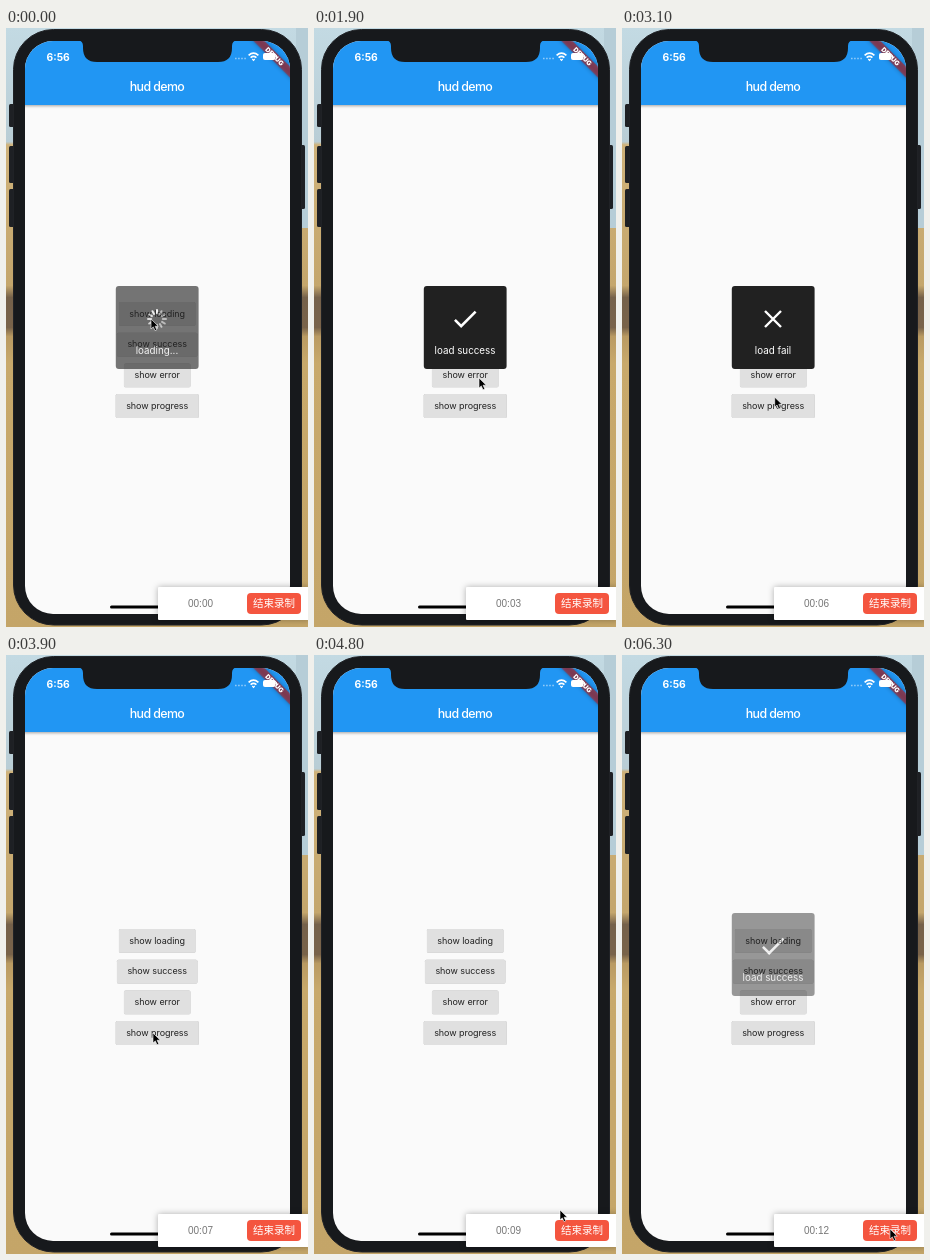
An HTML page for the animation above (6400 ms loop, 302x599 px).

```html
<!DOCTYPE html>
<html lang="en">
<head>
<meta charset="utf-8">
<title>HUD demo</title>
<style>
  html, body { margin: 0; width: 100%; height: 100%; overflow: hidden; }
  svg { display: block; width: 302px; height: 599px; font-family: Inter, Roboto, sans-serif; }
  .mid { text-anchor: middle; }
  .button { fill: #e0e0e0; filter: drop-shadow(0 .8px .7px rgba(0, 0, 0, .28)); }
  .label { font-size: 9px; fill: #222; letter-spacing: -.06px; }
  .panel { fill: #fff; filter: drop-shadow(0 0 3px rgba(0, 0, 0, .3)); }
</style>
</head>
<body>
<svg viewBox="0 0 302 599">
  <defs>
    <linearGradient id="desert" x2="0" y2="1">
      <stop offset="0" stop-color="#c3dae3"/>
      <stop offset=".19" stop-color="#b9cdd5"/>
      <stop offset=".195" stop-color="#cfb27a"/>
      <stop offset=".43" stop-color="#c4a66c"/>
      <stop offset=".45" stop-color="#75614a"/>
      <stop offset=".5" stop-color="#79634a"/>
      <stop offset=".515" stop-color="#b99a62"/>
      <stop offset=".56" stop-color="#c8a96b"/>
      <stop offset="1" stop-color="#c4a568"/>
    </linearGradient>
    <clipPath id="screen"><rect x="19" y="13" width="265" height="573" rx="28"/></clipPath>
  </defs>

  <rect width="302" height="599" fill="url(#desert)"/>
  <path d="M290 0h12v200h-12z" fill="#b6cdd7"/>
  <g fill="#1e2024">
    <rect x="3" y="76" width="6" height="23" rx="1.5"/>
    <rect x="3" y="118" width="6" height="37" rx="1.5"/>
    <rect x="3" y="161" width="6" height="38" rx="1.5"/>
    <rect x="293" y="117" width="6" height="64" rx="1.5"/>
  </g>
  <rect x="7.5" y="1.5" width="288" height="595.5" rx="40" fill="#17191c" stroke="#202226"/>

  <g clip-path="url(#screen)">
    <rect x="19" y="13" width="265" height="573" fill="#fafafa"/>
    <rect x="10" y="5" width="284" height="72" fill="#2196f3" style="filter:drop-shadow(0 1.5px 1.5px rgba(0,0,0,.35))"/>
    <text class="mid" x="151" y="63.4" font-size="12.4" font-weight="500" fill="#fff" letter-spacing="-.6">hud demo</text>
    <g id="buttons"></g>

    <g id="hud">
      <rect x="109.8" y="258" width="82.8" height="83" rx="3" fill="#212121"/>
      <g transform="translate(151 291)" fill="#fff">
        <g id="loading"></g>
        <path id="success" transform="scale(1.28) translate(-12 -12)" d="M9 16.17 4.83 12l-1.42 1.41L9 19 21 7l-1.41-1.41z"/>
        <path id="error" d="M-8-8 8 8M8-8-8 8" stroke="#fff" stroke-width="2.4"/>
        <g id="progress" fill="none" stroke="#fff" stroke-width="2">
          <circle r="13" stroke-opacity=".3"/>
          <circle id="arc" r="13" pathLength="100" transform="rotate(-90)"/>
        </g>
      </g>
      <text id="message" class="mid" x="151" y="326.3" font-size="9.8" fill="#fff"></text>
    </g>

    <g transform="translate(284 13) rotate(45)">
      <rect x="-30" y="18" width="60" height="7.7" fill="#b71c1c" fill-opacity=".63" style="filter:drop-shadow(0 0 2px rgba(0,0,0,.5))"/>
      <text class="mid" y="24.2" font-size="6.6" font-weight="900" fill="#fff">DEBUG</text>
    </g>
    <rect x="104" y="577.5" width="94" height="3" rx="1.5"/>
  </g>

  <path d="M72 12Q77 13 77 18v2q0 14 14 14h121q14 0 14-14v-2q0-5 5-6z" fill="#17191c"/>
  <text x="40.5" y="32.5" font-size="10.3" font-weight="650" fill="#fff">6:56</text>
  <path d="M229 30.5h11" stroke="#fff" stroke-opacity=".5" stroke-width="1.6" stroke-dasharray="1.6 1.5"/>
  <g fill="none" stroke="#fff" stroke-width="1.7">
    <path d="M242.6 27.4q4.9-4.4 9.8 0M244.6 29.6q2.9-2.4 5.8 0"/>
    <path d="m246.3 31 1.2 1.3 1.2-1.3" stroke-width="1.2"/>
  </g>
  <rect x="257" y="25" width="12.5" height="7" rx="2" fill="#fff"/>
  <rect x="270" y="27" width="1" height="3" rx=".5" fill="#fff"/>

  <rect class="panel" x="152" y="559" width="152" height="33" rx="1"/>
  <text id="clock" x="182" y="579.3" font-size="10" fill="#777" font-family="Liberation Sans, Arial, sans-serif"></text>
  <rect x="241" y="565" width="54" height="21" rx="4" fill="#f4553f"/>
  <text class="mid" x="268" y="579.4" font-size="10.5" fill="#fff" font-family="Noto Sans CJK SC, Noto Sans CJK, sans-serif" lang="zh">结束录制</text>

  <g id="cursor">
    <circle id="ring" r="15.6" cx="-.5" fill="#fff" fill-opacity=".15" stroke="#111" stroke-width=".9"/>
    <path d="M0 0v10l2.3-2.1 1.7 3.8 1.8-.8-1.7-3.7h3.2z" fill="#000" stroke="#fff" stroke-width=".6"/>
  </g>
</svg>

<script>
const LOOP = 6400, STEP = 100, FADE = 100;
const $ = id => document.getElementById(id);
const clamp = v => Math.max(0, Math.min(1, v));
const ease = v => v * v * (3 - 2 * v);
const kinds = ['loading', 'success', 'error', 'progress'];

// start and end are where the fades begin
const huds = [
  { kind: 'loading', text: 'loading...', start: -61, end: 440 },
  { kind: 'success', text: 'load success', start: 756, end: 2206 },
  { kind: 'error', text: 'load fail', start: 2450, end: 3600 },
  { kind: 'progress', text: 'loading', start: 3980, end: 4800 },
  { kind: 'success', text: 'load success', start: 4800, end: 6245 }
];
const clicks = [[650, 750], [2350, 2450], [3950, 4050]];
// time, x, y
const path = [
  [0, 145, 291], [250, 145, 291], [600, 160, 319], [950, 160, 319],
  [1500, 165, 350], [2600, 165, 350], [3400, 147, 378], [4100, 147, 378],
  [4800, 246, 555], [5300, 268, 574], [LOOP, 268, 574]
];

$('buttons').innerHTML = [['loading', 76.5], ['success', 80.5], ['error', 66.5], ['progress', 83]]
  .map(([name, w], i) => {
    const y = 274 + i * 30.7;
    return `<rect class="button" x="${151.2 - w / 2}" y="${y}" width="${w}" height="23.8" rx="1.5"/>
      <text class="label mid" x="151.2" y="${y + 14.7}">show ${name}</text>`;
  }).join('');

$('loading').innerHTML = Array.from({ length: 12 }, (_, i) =>
  `<rect x="-1" y="-10" width="2" height="5.2" rx="1" transform="rotate(${i * 30})"/>`).join('');
const ticks = [...$('loading').children];

function drawHud(t) {
  const hud = huds.find(h => t >= h.start && t < h.end + (h.kind === 'progress' ? 0 : FADE));
  $('hud').style.display = hud ? '' : 'none';
  if (!hud) return;
  const fadeOut = hud.kind === 'progress' ? 1 : clamp(1 - (t - hud.end) / FADE);
  $('hud').setAttribute('opacity', Math.min(clamp((t - hud.start) / FADE), fadeOut));
  for (const kind of kinds) $(kind).style.display = kind === hud.kind ? '' : 'none';

  const percent = Math.floor(clamp((t - hud.start) / 800) * 100);
  $('message').textContent = hud.kind === 'progress' ? `${hud.text} ${percent}%` : hud.text;
  $('arc').setAttribute('stroke-dasharray', `${percent} 100`);
  const head = Math.floor(t / 500 * 12);
  ticks.forEach((tick, i) => {
    const age = ((head - i) % 12 + 12) % 12;
    tick.setAttribute('opacity', Math.max(.6, 1 - age * .06));
  });
}

function drawCursor(t) {
  const i = path.findIndex(p => p[0] > t);
  const [a, b] = [path[i - 1], path[i]];
  const k = ease((t - a[0]) / (b[0] - a[0]));
  const at = n => a[n] + (b[n] - a[n]) * k;
  $('cursor').setAttribute('transform', `translate(${at(1)} ${at(2)})`);
  $('ring').style.display = clicks.some(([from, to]) => t >= from && t < to) ? '' : 'none';
}

function frame(now) {
  const t = Math.floor(now % LOOP / STEP) * STEP;
  drawHud(t);
  drawCursor(t);
  $('clock').textContent = '00:' + String(Math.floor(t / 500)).padStart(2, '0');
  requestAnimationFrame(frame);
}
frame(0);
</script>
</body>
</html>
```
